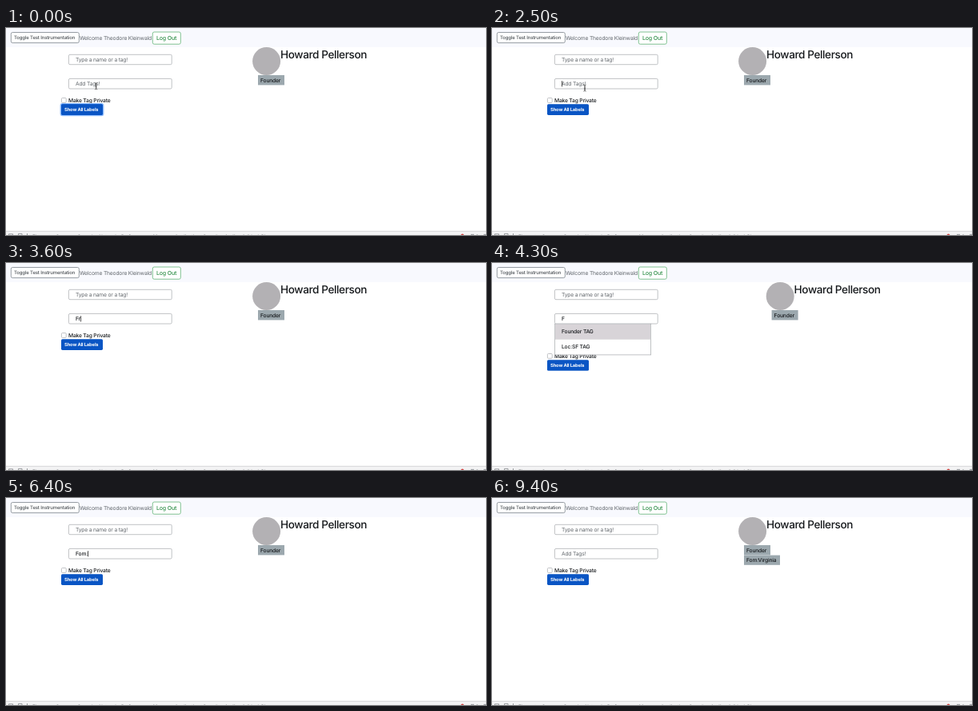
An HTML page for the animation above (9.5 s loop, 600x259 px).

```html
<!DOCTYPE html>
<html lang="en">
<head>
<meta charset="utf-8">
<title>Tag editor</title>
<style>
  html, body { margin: 0; width: 100%; height: 100%; overflow: hidden; background: #fff; }
  svg { display: block; width: 600px; height: 259px; }
  text {
    font: 500 6.7px Inter, "Liberation Sans", sans-serif; letter-spacing: -.025em;
    text-rendering: geometricPrecision; fill: #16191c; white-space: pre;
  }
  .muted { font-weight: 400; fill: #62676c; }
  .small { font-size: 6px; fill: #4b5055; }
  .green { font-size: 7px; fill: #2f8f48; }
  .strong { font-size: 5.8px; font-weight: 700; fill: #fff; }
  .name { font-size: 13.6px; letter-spacing: -.03em; }
  .box { fill: #fff; stroke: #b0b3b6; stroke-width: .8; }
  .tag { fill: #9ca8ae; }
</style>
</head>
<body>
<svg viewBox="0 0 600 259">
  <rect width="600" height="24" fill="#f8f9fe"/>
  <rect class="box" x="6.3" y="5.5" width="85" height="13.1" rx="2" style="stroke:#7d858c"/>
  <text class="small" x="10" y="14.3">Toggle Test Instrumentation</text>
  <text class="muted" x="92" y="14.5">Welcome Theodore Kleinwald</text>
  <rect class="box" x="183.3" y="5" width="35" height="15.2" rx="2" style="stroke:#62b476"/>
  <text class="green" x="188" y="15.2">Log Out</text>

  <rect class="box" x="78.4" y="33.3" width="128.8" height="12.4" rx="1.6"/>
  <text class="muted" x="87" y="41.7">Type a name or a tag!</text>
  <rect class="box" x="78.4" y="63.4" width="128.8" height="12.6" rx="1.6"/>
  <text id="entry" x="87" y="72"></text>
  <rect id="caret" y="66.2" width=".8" height="7.2" fill="#222"/>

  <g id="controls">
    <rect class="box" x="69.4" y="87.6" width="5.8" height="5.8" rx="1"/>
    <text x="78" y="92.7">Make Tag Private</text>
    <rect id="ring" x="68.4" y="94.8" width="53.2" height="14.6" rx="2.2" fill="#0a5fe0" stroke="#8ebcff" stroke-width="1.6"/>
    <rect x="69" y="95.3" width="52" height="13.6" rx="1.6" fill="#0a55c4"/>
    <text class="strong" x="73" y="104.2">Show All Labels</text>
  </g>

  <g id="menu">
    <rect id="list" class="box" x="78.4" y="76.3" width="120.2"/>
    <rect x="78.8" y="76.7" width="119.4" height="19" fill="#d8d4d8"/>
    <text x="87" y="88.2">Founder TAG</text>
    <text id="second" x="87" y="107.4">Loc:SF TAG</text>
  </g>

  <g id="person">
    <circle cx="325.6" cy="41.5" r="17.5" fill="#b3b1b4"/>
    <text class="name" x="343" y="38">Howard Pellerson</text>
    <rect class="tag" x="315" y="59" width="33" height="12.4"/>
    <text x="318" y="67.6">Founder</text>
    <g id="added">
      <rect class="tag" x="315" y="71.6" width="45" height="12.2"/>
      <text x="318" y="80.2">Fom:Virginia</text>
    </g>
  </g>

  <path id="pointer" d="M-1.6-4q1.6 0 1.6 1.2V3q0 1.2-1.6 1.2M1.6-4Q0-4 0-2.8V3q0 1.2 1.6 1.2M-1 1H1" fill="none" stroke="#555" stroke-width=".8"/>

  <rect y="254" width="600" height="5" fill="#f3f3f4"/>
  <path d="M0 254.3H600" stroke="#c9cacc" stroke-width=".7"/>
  <path d="M3.5 260V257.8H8.5V260M15.5 260V257.4H20V260M26.5 257V260M581 258.4H585M589 258V260M597 258.4H600" fill="none" stroke="#85888b" stroke-width=".8"/>
  <text class="small" x="33" y="262.6">Elements   Sources   Console   Network   Performance   Memory   Application   Security   Audits   Adblock Plus</text>
  <circle cx="570.5" cy="259.4" r="2" fill="#d34a48"/>
</svg>
<script>
const LOOP = 9500, FADE = 150, CLICK = 300, ADDED = 9400;

// [time, text, number of menu items]
const typing = [
  [0, ""], [3000, "F", 2], [3400, "Fr"], [4300, "F", 2], [5400, "Fo", 1], [5800, "Fom"], [6400, "Fom:"],
  [6900, "Fom:V"], [7100, "Fom:Vi"], [7400, "Fom:Vir"], [7600, "Fom:Virg"], [7700, "Fom:Virgi"],
  [8000, "Fom:Virgin"], [8100, "Fom:Virgini"], [8200, "Fom:Virginia"], [ADDED, ""]
];
// The caret starts hidden and toggles at each time
const blinks = [CLICK, 1000, 1400, 2000, 2350, 4000, 4450, 5000, 5400, 8450, 8900];

const $ = id => document.getElementById(id);
const show = (id, on) => $(id).setAttribute("visibility", on ? "visible" : "hidden");
const move = (id, x, y) => $(id).setAttribute("transform", `translate(${x} ${y})`);
const ramp = (t, start, length) => Math.min(1, Math.max(0, (t - start) / length));

function draw(t) {
  const [, text, items = 0] = typing.findLast(step => step[0] <= t);
  const entry = $("entry");
  entry.textContent = text || "Add Tags!";
  entry.setAttribute("class", text ? "" : "muted");

  const opacity = blinks.reduce((sum, time, i) => sum + (i % 2 ? -1 : 1) * ramp(t, time, FADE), 0);
  $("caret").setAttribute("opacity", t < ADDED ? opacity : 0);
  $("caret").setAttribute("x", 87 + (text ? entry.getComputedTextLength() + .2 : 0));

  show("menu", items);
  show("second", items > 1);
  $("list").setAttribute("height", items * 19.3);
  move("controls", 0, items ? items * 19.3 - 12.7 : 0);
  move("person", items ? 34.6 : 0, 0);
  show("added", t >= ADDED);

  const slide = ramp(t, 100, 500);
  move("pointer", 112.6 + 3.4 * slide, 72.6 + 2.4 * slide);
  show("pointer", t < 3000);
  $("ring").setAttribute("opacity", 1 - ramp(t, CLICK, FADE));
}

const start = performance.now();
function tick() {
  draw((performance.now() - start) % LOOP);
  requestAnimationFrame(tick);
}
tick();
</script>
</body>
</html>
```
